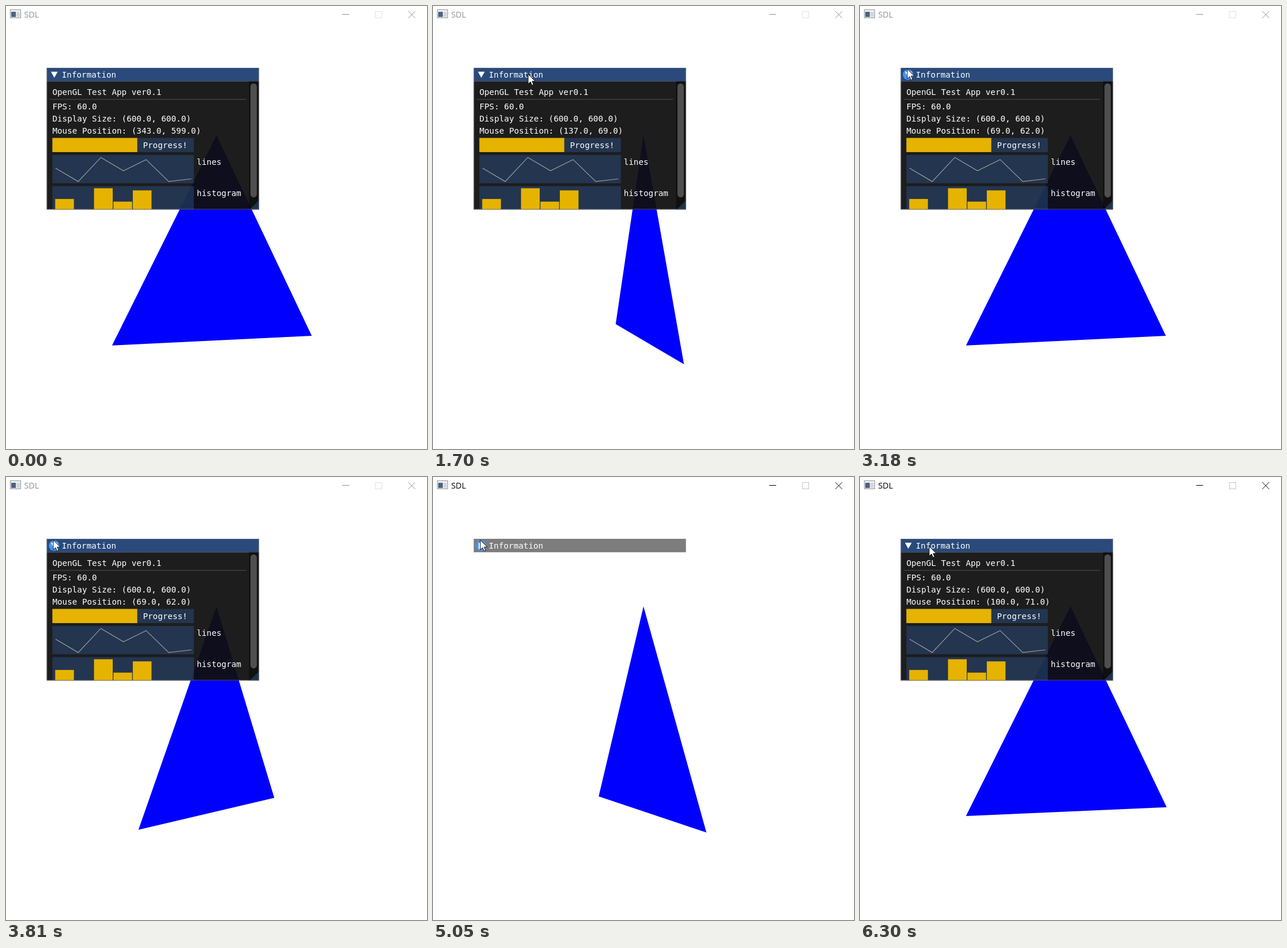
An HTML page with a canvas that plays this animation: 730 px wide and 767 px high, repeating every 6.35 s.

```html
<!DOCTYPE html>
<html lang="en">
<head>
<meta charset="utf-8">
<title>SDL</title>
<style>
html, body { margin: 0; width: 100%; height: 100%; overflow: hidden; background: #fff; }
canvas { display: block; }
</style>
</head>
<body>
<canvas id="stage" width="730" height="767"></canvas>
<script>
const ctx = document.getElementById('stage').getContext('2d');
const LOOP = 6350;
// The 600 x 600 interface is shown enlarged, below the title bar of the window
const SCALE = 736 / 600, LEFT = -3, TOP = 33.4;
const MONO = '11.63px "DejaVu Sans Mono", monospace';
const FRAME = 'rgba(41,74,122,.54)', BORDER = 'rgba(110,110,128,.5)';
const VALUES = [0.6, 0.1, 1, 0.5, 0.92, 0.1, 0.2];

const ENTER = 300, FOCUS = 3860, COLLAPSE = 5050, EXPAND = 5840;
const CLICKS = [FOCUS, COLLAPSE - 100, EXPAND - 100], PRESS = 100;
const MOVES = [
  { start: 300, end: 980, x: 188, y: 202 },
  { start: 980, end: 1350, x: 137, y: 69 },
  { start: 2640, end: 3150, x: 69, y: 62 },
  { start: 5900, end: 6200, x: 100, y: 71 },
];

const clamp = (v, lo, hi) => Math.min(hi, Math.max(lo, v));
const smooth = u => u * u * (3 - 2 * u);

function mouseAt(t) {
  let x = t < ENTER ? 343 : 520, y = 599;
  for (const m of MOVES) {
    const u = smooth(clamp((t - m.start) / (m.end - m.start), 0, 1));
    x += (m.x - x) * u;
    y += (m.y - y) * u;
  }
  return [Math.round(x), Math.round(y)];
}

// One radian per second, with one short stall
const angleAt = t => 0.237 + (t - clamp(t - 1300, 0, 40)) / 1000;

function rect(x, y, w, h, color) {
  ctx.fillStyle = color;
  ctx.fillRect(x, y, w, h);
}

function outline(x, y, w, h, color) {
  ctx.strokeStyle = color;
  ctx.lineWidth = 1;
  ctx.strokeRect(x + .5, y + .5, w - 1, h - 1);
}

function path(points) {
  ctx.beginPath();
  points.forEach(p => ctx.lineTo(...p));
}

function poly(points, color) {
  path(points);
  ctx.fillStyle = color;
  ctx.fill();
}

function line(points, color, width = 1) {
  path(points);
  ctx.strokeStyle = color;
  ctx.lineWidth = width;
  ctx.stroke();
}

function disc(x, y, r, color) {
  ctx.beginPath();
  ctx.arc(x, y, r, 0, Math.PI * 2);
  ctx.fillStyle = color;
  ctx.fill();
}

function text(s, x, y, color = '#fff', font = MONO) {
  ctx.font = font;
  ctx.fillStyle = color;
  ctx.fillText(s, x, y);
}

// Panel text is placed by the top of its line
const label = (s, x, y) => text(s, x, y + 11);

function drawChrome(focused) {
  const ink = focused ? '#000' : '#929292';
  rect(7, 6, 19, 15, '#8f949b');
  rect(8, 7, 17, 13, '#f1f2f4');
  rect(9, 10, 8, 9, '#4c6482');
  rect(18, 10, 6, 9, '#d4d7da');
  text('SDL', 31.5, 19.5, ink, '14.3px "Open Sans", "Noto Sans", sans-serif');
  rect(583, 14, 12, 1, ink);
  outline(640, 9, 12, 12, focused ? '#c4c4d2' : '#e2e2e2');
  line([[697.5, 9], [709.5, 21]], ink);
  line([[709.5, 9], [697.5, 21]], ink);
}

// Triangle turning about its vertical axis, seen in perspective
function drawTriangle(angle) {
  const corner = side => {
    const depth = 1 + side * .1957 * Math.sin(angle);
    return [365 + side * 177.8 * Math.cos(angle) / depth, 398 + 181 / depth];
  };
  poly([[365, 224], corner(-1), corner(1)], '#00f');
}

function drawTitle(collapsed, hover) {
  rect(60, 60, 300, 19, collapsed ? 'rgba(0,0,0,.51)' : '#294a7a');
  if (hover) disc(70.5, 69.5, 7.5, '#4296fa');
  poly(collapsed ? [[67, 65], [67, 75], [75, 70]] : [[66, 65.5], [75.5, 65.5], [70.7, 74]], '#fff');
  label('Information', 81.3, 63);
}

// Height of a value above the smallest one, in a plot 34 high
const rise = v => 34 * (v - .1) / .9;

function drawBody(mx, my, hot) {
  rect(60, 79, 300, 181, 'rgba(15,15,15,.94)');
  label('OpenGL Test App ver0.1', 68, 87);
  rect(64, 104, 278, 1, BORDER);
  const lines = ['FPS: 60.0', 'Display Size: (600.0, 600.0)',
    `Mouse Position: (${mx.toFixed(1)}, ${my.toFixed(1)})`];
  lines.forEach((s, i) => label(s, 68, 108 + i * 17));

  rect(68, 159, 200, 20, FRAME);
  rect(68, 159, 120, 20, '#e6b300');
  label('Progress!', 196, 162);

  rect(68, 183, 200, 40, FRAME);
  const points = VALUES.map((v, i) => [72.5 + i * 32, 220.5 - rise(v)]);
  line(points, '#9c9c9c');
  if (hot >= 0) line(points.slice(hot, hot + 2), '#ff6e59');
  label('lines', 272, 186);

  rect(68, 227, 200, 33, FRAME);
  VALUES.forEach((v, i) => {
    const top = 264 - rise(v), step = 192 / 7;
    if (top < 260) rect(72 + i * step, top, step - 1, 260 - top, '#e6b300');
  });
  label('histogram', 272, 230);

  rect(346, 79, 14, 181, 'rgba(5,5,5,.53)');
  ctx.beginPath();
  ctx.roundRect(348, 82, 9, 161, 4.5);
  ctx.fillStyle = '#4f4f4f';
  ctx.fill();
  poly([[360, 247], [360, 260], [347, 260]], 'rgba(66,150,250,.25)');
  outline(60, 60, 300, 200, BORDER);
}

function drawTooltip(x, y, i) {
  rect(x, y, 92, 40, 'rgba(20,20,20,.94)');
  outline(x, y, 92, 40, BORDER);
  [i, i + 1].forEach((n, row) =>
    label(`${n}: ${String(VALUES[n]).padStart(8)}`, x + 8, y + 8 + row * 13));
}

function drawCursor(x, y) {
  const shape = [[0, 0], [0, 17], [4, 13.3], [6.6, 19.3], [9.3, 18.1], [6.7, 12.3], [12, 12.3], [0, 0]]
    .map(([px, py]) => [x + px, y + py]);
  poly(shape, '#fff');
  line(shape, '#111');
}

function draw(t) {
  const [mx, my] = mouseAt(t);
  const x = Math.round(mx * SCALE + LEFT), y = Math.round(my * SCALE + TOP);
  const collapsed = t >= COLLAPSE && t < EXPAND;
  const onButton = Math.hypot(mx - 70.5, my - 69.5) < 8;
  const onPlot = mx >= 72 && mx < 264 && my >= 186 && my < 220;
  const hot = onPlot ? Math.floor((mx - 72) / 32) : -1;

  rect(0, 0, 730, 767, '#fff');
  drawChrome(t >= FOCUS);
  drawTriangle(angleAt(t));

  ctx.save();
  ctx.transform(SCALE, 0, 0, SCALE, LEFT, TOP);
  drawTitle(collapsed, onButton);
  if (!collapsed) drawBody(mx, my, hot);
  if (hot >= 0) drawTooltip(mx + 25, my + 1, hot);
  ctx.restore();

  if (CLICKS.some(c => t >= c && t < c + PRESS)) disc(x, y, 15, 'rgba(255,255,0,.47)');
  if (t >= ENTER) drawCursor(x, y);
}

function tick() {
  draw(performance.now() % LOOP);
  requestAnimationFrame(tick);
}
tick();
</script>
</body>
</html>
```
